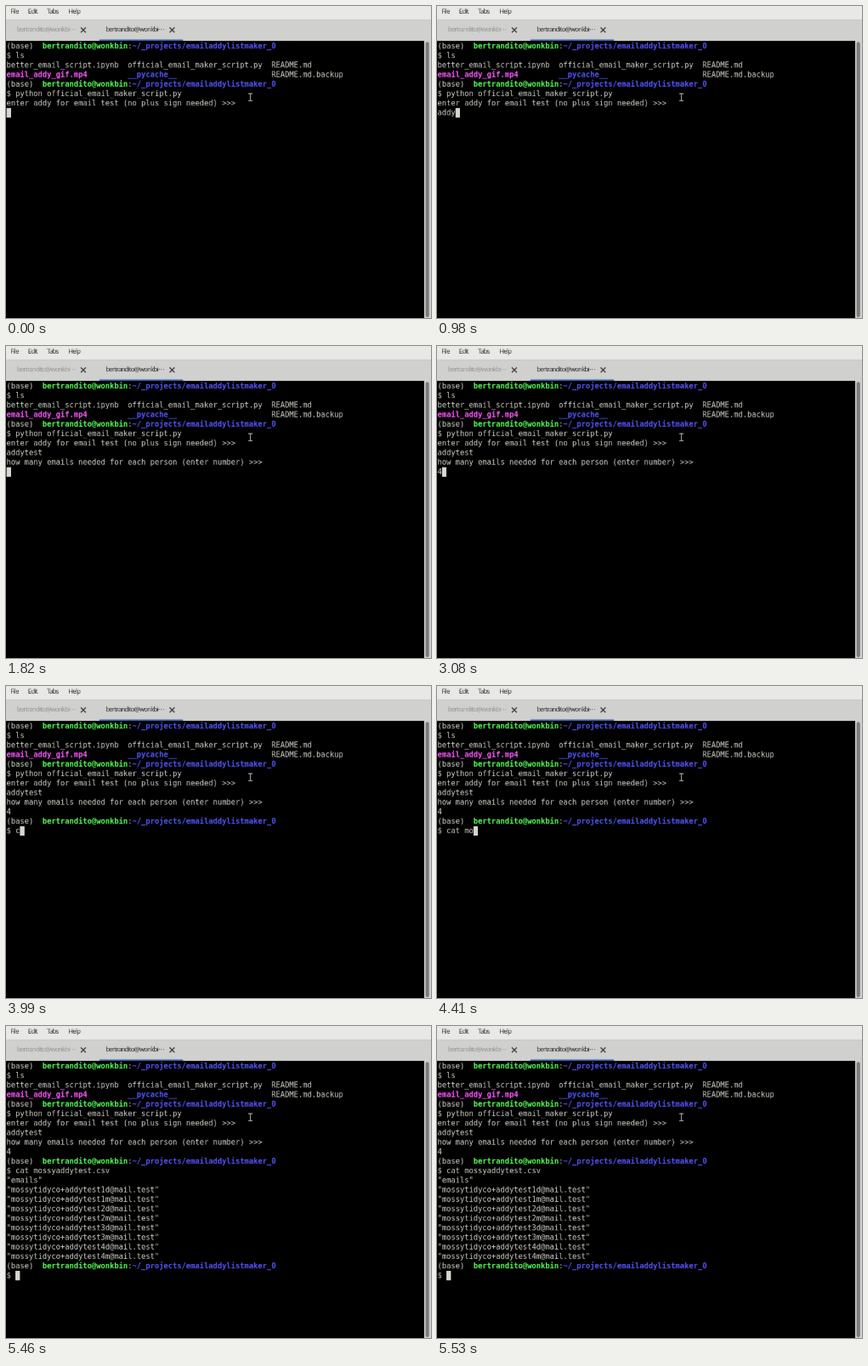
Animation, 500 px wide and 367 px high, one loop 6860 ms. Source, as an HTML page with a canvas:

```html
<!DOCTYPE html>
<html lang="en">
<head>
<meta charset="utf-8">
<title>Terminal session</title>
<style>
html, body { margin: 0; width: 100%; height: 100%; overflow: hidden; background: #000; }
canvas { display: block; }
</style>
</head>
<body>
<canvas id="stage" width="500" height="367"></canvas>
<script>
// The desktop is drawn at full size, then scaled smoothly onto the stage.
const stage = document.getElementById('stage').getContext('2d');
const desktop = document.createElement('canvas');
const WIDTH = desktop.width = 852, HEIGHT = desktop.height = 623;
const ctx = desktop.getContext('2d');
stage.imageSmoothingQuality = 'high';

const LOOP = 6860;
const CELL_W = 9, CELL_H = 19, LEFT = 1, TOP = 71;
const GREY = '#d0d0c8', GREEN = '#55ff55', BLUE = '#5555ff', PINK = '#ff55ff';
const USER = 'bertrandito@wonkbin';

const plain = text => [[text, GREY]];
const prompt = [['(base)  ', GREY], [USER, GREEN], [':', GREY],
                ['~/_projects/emailaddylistmaker_0', BLUE]];

const intro = [
  prompt,
  plain('$ ls'),
  plain('better_email_script.ipynb  official_email_maker_script.py  README.md'),
  [['email_addy_gif.mp4', PINK], [' '.repeat(9), GREY], ['__pycache__', BLUE],
   [' '.repeat(21) + 'README.md.backup', GREY]],
  prompt,
  plain('$ python official_email_maker_script.py'),
  plain('enter addy for email test (no plus sign needed) >>>')
];

const emails = [1, 2, 3, 4].flatMap(n =>
  ['d', 'm'].map(kind => plain(`"mossytidyco+addytest${n}${kind}@mail.test"`)));

const addyKeys = [490, 630, 770, 910, 1190, 1330, 1470, 1540];
const catKeys = [3990, 4060, 4130, 4200, 4270, 4410, 4550];
const catCommand = 'cat mossyaddytest.csv ';

const typed = (text, keys, t) => text.slice(0, keys.filter(k => k <= t).length);

function screenAt(t) {
  const rows = [...intro, plain(typed('addytest', addyKeys, t))];
  if (t >= 1750) {
    rows.push(plain('how many emails needed for each person (enter number) >>>'),
              plain(typed('4', [3080], t)));
  }
  if (t >= 3360 && t < 3430) rows.push(plain(''));
  if (t >= 3430) {
    const command = t >= 4830 ? catCommand : typed(catCommand, catKeys, t);
    rows.push(prompt, plain('$ ' + command));
  }
  if (t >= 5460) rows.push(plain('"emails"'), ...emails, prompt, plain('$ '));
  return rows;
}

function rect(x, y, w, h, color) {
  ctx.fillStyle = color;
  ctx.fillRect(x, y, w, h);
}

function line(color, width, ...segments) {
  ctx.strokeStyle = color;
  ctx.lineWidth = width;
  ctx.beginPath();
  for (const [x1, y1, x2, y2] of segments) {
    ctx.moveTo(x1, y1);
    ctx.lineTo(x2, y2);
  }
  ctx.stroke();
}

function label(text, x, y, color) {
  ctx.font = '13px "Open Sans", "Noto Sans", sans-serif';
  ctx.letterSpacing = '-1.1px';
  ctx.fillStyle = color;
  ctx.fillText(text, x, y);
  ctx.letterSpacing = '0px';
}

function tab(x, color) {
  label(USER.slice(0, -1) + '⋯', x, 51, color);
  const cx = x + 133, cy = 48, r = 5;
  line('#3c3c3c', 2.4, [cx - r, cy - r, cx + r, cy + r], [cx - r, cy + r, cx + r, cy - r]);
}

function drawWindow() {
  rect(0, 0, WIDTH, HEIGHT, '#000');
  rect(0, 0, WIDTH, 27, '#e8e8e6');
  rect(0, 27, WIDTH, 43, '#d0d0ce');
  rect(0, 27, WIDTH, 1, '#c0c0be');
  [['File', 9], ['Edit', 44], ['Tabs', 82], ['Help', 125]]
    .forEach(([text, x]) => label(text, x, 15, '#1c1c1c'));
  tab(22, '#8c8c88');
  tab(200, '#1c1c1c');
  rect(187, 67, 168, 3, '#3465b4');
  rect(838, 70, 14, HEIGHT - 70, '#cfcfcd');
  ctx.fillStyle = '#7c7c7c';
  ctx.beginPath();
  ctx.roundRect(841, 72, 7, 549, 3.5);
  ctx.fill();
}

function drawText(rows) {
  rows.forEach((row, r) => {
    let col = 0;
    for (const [text, color] of row) {
      const weight = color === GREY ? '' : 'bold ';
      ctx.font = weight + '15px "DejaVu Sans Mono", monospace';
      ctx.fillStyle = color;
      for (const char of text) {
        ctx.fillText(char, LEFT + col++ * CELL_W, TOP + r * CELL_H + 14);
      }
    }
  });
  const last = rows.length - 1;
  rect(LEFT + rows[last][0][0].length * CELL_W, TOP + last * CELL_H, CELL_W, CELL_H, '#d8d8d0');
}

function drawPointer() {
  line('#d8d8d8', 1.6, [490, 176, 490, 188], [486, 175, 494, 175], [486, 189, 494, 189]);
}

function frame(elapsed) {
  drawWindow();
  drawText(screenAt(elapsed % LOOP));
  drawPointer();
  stage.drawImage(desktop, 0, 0, 500, 367);
  requestAnimationFrame(() => frame(performance.now() - start));
}

const start = performance.now();
frame(0);
</script>
</body>
</html>
```
